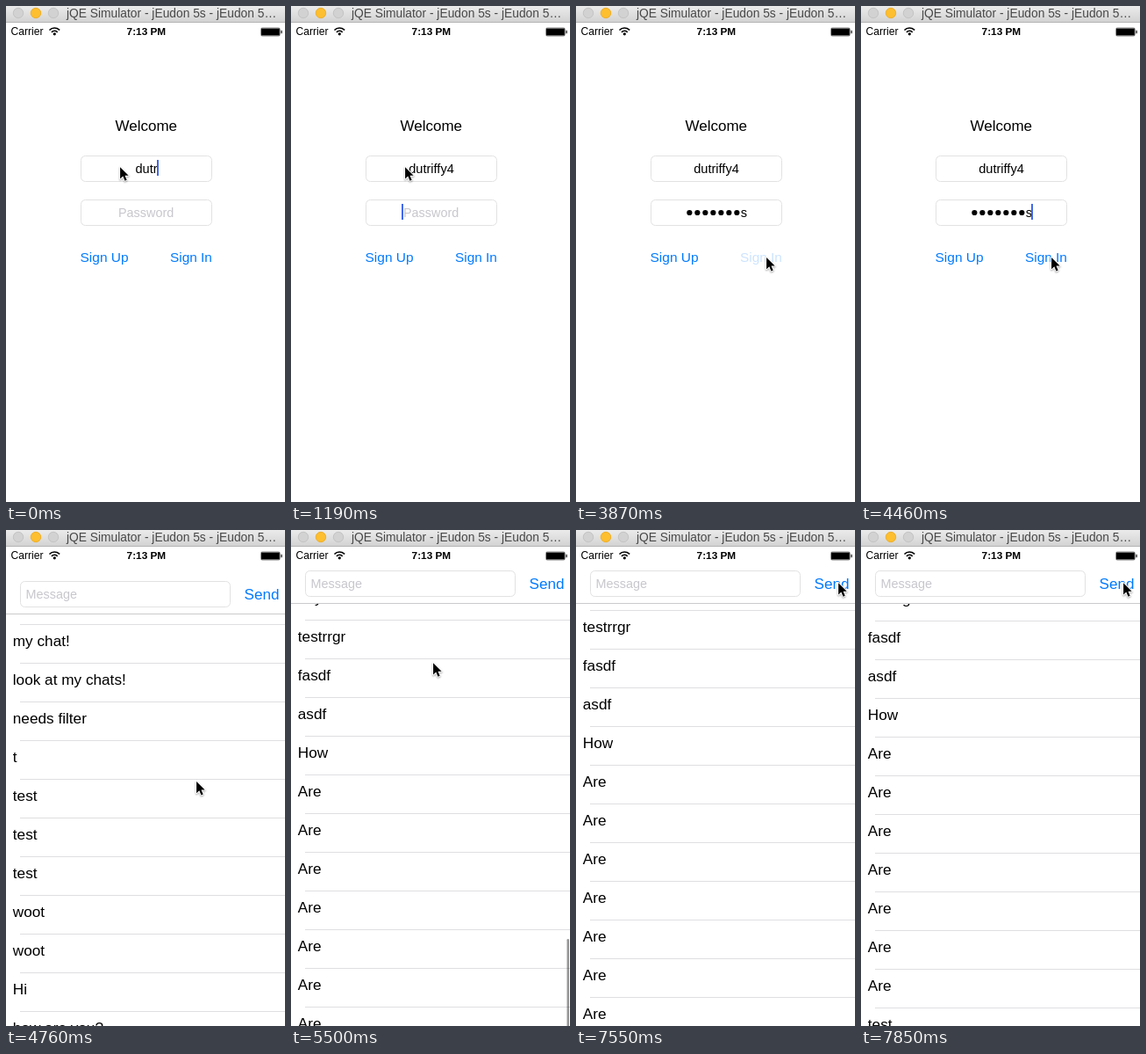
An HTML page with a canvas for the animation above (7990 ms loop, 318 px wide and 564 px high).

```html
<!DOCTYPE html>
<html lang="en">
<head>
<meta charset="utf-8">
<title>Sign in and chat</title>
<style>
  html, body { margin: 0; width: 100%; height: 100%; overflow: hidden; background: #fff; }
  canvas { display: block; width: 318px; height: 564px; }
</style>
</head>
<body>
<canvas id="stage"></canvas>
<script>
const W = 318, H = 564, LOOP = 7990;
const BLUE = '#007aff', HINT = '#c7c7cd', CARET = '#4068ee';
const FONT = '"Liberation Sans", Arial, sans-serif';
const USER = 'dutriffy4', SECRET = 'dutrilts', MESSAGE = 'test';

// Steps at which each key lands
const USER_KEYS = [0, 0, 0, 0, 1, 2, 2, 3, 6];
const SECRET_KEYS = [11, 12, 13, 15, 18, 20, 20, 21];
const MESSAGE_KEYS = [42, 43, 44, 45];

// Pointer stops: step, x, y
const POINTER = [
  [0, 129.3, 182.3], [22, 129.3, 182.3], [25, 216.3, 285], [33, 216.3, 285],
  [36, 161.3, 150.3], [38, 161.3, 150.3], [41, 240.3, 58.3], [46, 240.3, 58.3], [48, 298.3, 59.3]
];

const ROW = 44;
const ROWS = [
  'hello', 'my chat!', 'look at my chats!', 'needs filter', 't', 'test', 'test', 'test',
  'woot', 'woot', 'Hi', 'how are you?', 'good', 'test', 'hello', 'test', 'chat', 'woot',
  'Hi', 'test', 'hey there', 'test', 'asdf', 'test', 'hello', 'woot', 'test', 'hey',
  'testrrgr', 'fasdf', 'asdf', 'How', ...Array(7).fill('Are')
];
const FIRST_TOP = 51.5;
const SCROLL_END = FIRST_TOP + ROW * (ROWS.length - 1) - 542.5;

const canvas = document.getElementById('stage');
const ctx = canvas.getContext('2d');
const dpr = window.devicePixelRatio || 1;
canvas.width = W * dpr;
canvas.height = H * dpr;

const clamp = v => Math.min(1, Math.max(0, v));
const smooth = v => { v = clamp(v); return v * v * (3 - 2 * v); };
const typed = (keys, k) => keys.filter(at => k >= at).length;

// The screen refreshes in steps of about 148 ms
function stepAt(t) {
  return t < 3864 ? Math.floor((t + 12) / 149.2) : 26 + Math.floor((t - 3864) / 147.4);
}

function rect(x, y, w, h, color) {
  ctx.fillStyle = color;
  ctx.fillRect(x, y, w, h);
}

function text(str, x, y, size, color = '#000', weight = '') {
  ctx.font = `${weight} ${size}px ${FONT}`;
  ctx.fillStyle = color;
  ctx.fillText(str, x, y);
}

function widthOf(str, size) {
  ctx.font = `${size}px ${FONT}`;
  return ctx.measureText(str).width;
}

function disc(x, y, r, fill, stroke) {
  ctx.beginPath();
  ctx.arc(x, y, r, 0, Math.PI * 2);
  ctx.fillStyle = fill;
  ctx.fill();
  if (stroke) {
    ctx.strokeStyle = stroke;
    ctx.lineWidth = 1;
    ctx.stroke();
  }
}

function field(x, y, w) {
  ctx.beginPath();
  ctx.roundRect(x + 0.5, y + 0.5, w - 1, 29, 5);
  ctx.fillStyle = '#fff';
  ctx.fill();
  ctx.strokeStyle = '#e2e2e2';
  ctx.lineWidth = 1;
  ctx.stroke();
}

const caret = (x, y) => rect(Math.round(x), y, 2, 18, CARET);

function titleBar() {
  const shade = ctx.createLinearGradient(0, 0, 0, 18);
  shade.addColorStop(0, '#ebebeb');
  shade.addColorStop(1, '#d3d3d3');
  rect(0, 0, W, 18, shade);
  rect(0, 18, W, 1, '#b4b4b4');
  disc(14, 8, 5.7, '#d2d2d2', '#c4c4c4');
  disc(34, 8, 5.7, '#fdbe2f', '#eeb02c');
  disc(54, 8, 5.7, '#d2d2d2', '#c4c4c4');
  text('jQE Simulator - jEudon 5s - jEudon 5…', 69, 13, 13.8, '#484848');
}

function statusBar() {
  text('Carrier', 5.5, 33.3, 12.1);
  text('7:13 PM', 137.6, 33, 11.8, '#000', 'bold');
  ctx.strokeStyle = '#000';
  ctx.lineWidth = 1.6;
  for (const r of [4.6, 8]) {
    ctx.beginPath();
    ctx.arc(55.3, 33, r, -Math.PI * 0.76, -Math.PI * 0.24);
    ctx.stroke();
  }
  disc(55.3, 31.8, 1.6, '#000');
  ctx.strokeStyle = '#777';
  ctx.lineWidth = 0.8;
  ctx.beginPath();
  ctx.roundRect(290.4, 24.9, 22, 9.2, 1.8);
  ctx.stroke();
  rect(291, 25.5, 20.8, 8, '#000');
  rect(313.4, 27.8, 1.3, 3.4, '#222');
}

function signIn(k) {
  text('Welcome', 124.5, 142, 17);

  field(85, 170, 150);
  const name = USER.slice(0, typed(USER_KEYS, k));
  const nameW = widthOf(name, 14.6);
  text(name, 160 - nameW / 2, 189.5, 14.6);
  if (k < 8) caret(159 + nameW / 2, 175);

  field(85, 220, 150);
  const count = typed(SECRET_KEYS, k);
  const blink = k >= 26 && k < 29;
  if (!count) {
    text('Password', 128, 239.5, 14.4, HINT);
    if (k >= 8) caret(126, 225);
  } else {
    const last = SECRET[count - 1];
    const w = (count - 1) * 9 + widthOf(last, 14.6);
    const x = 160 - w / 2;
    for (let i = 0; i < count - 1; i++) disc(x + 4.5 + i * 9, 235, 3.1, '#000');
    text(last, x + (count - 1) * 9, 239.5, 14.6);
    if (!blink) caret(159.3 + w / 2, 225);
  }

  text('Sign Up', 84.5, 290.5, 15.5, BLUE);
  text('Sign In', 187, 290.5, 15.4, k === 26 || k === 27 ? '#cce4ff' : BLUE);
}

function chat(k) {
  // Sheet slides up on a damped spring
  const x = 2.73 * (k - 29.9);
  const drop = Math.round(546 * (1 + x) * Math.exp(-x));
  const flick = smooth((k - 33) / 4);
  const scroll = flick * SCROLL_END + 43 * smooth((k - 50) / 3);
  const rows = k > 50 ? [...ROWS, MESSAGE] : ROWS;

  ctx.save();
  ctx.translate(0, drop);
  rect(0, 19, W, H, '#fff');

  rows.forEach((label, i) => {
    const top = Math.round(FIRST_TOP + i * ROW - scroll - 0.5) + 0.5;
    if (top < 30 || top > H) return;
    text(label, 7.8, top + 24, 17.2);
    rect(16, top + ROW - 0.5, W - 16, 1, '#dfdee1');
  });

  const glow = k < 34 ? 0 : 0.42 * clamp((40 - k) / 2);
  if (glow) {
    ctx.beginPath();
    ctx.roundRect(314.5, 86 + 379 * flick, 2.5, 120, 1.25);
    ctx.fillStyle = `rgba(0,0,0,${glow})`;
    ctx.fill();
  }

  rect(0, 19, W, 64, '#fff');
  rect(0, 83, W, 1, '#cbcbcd');
  field(16, 46, 240);
  const draft = k < 50 ? MESSAGE.slice(0, typed(MESSAGE_KEYS, k)) : '';
  if (draft) text(draft, 23, 65.5, 14.4);
  else text('Message', 22.5, 65.5, 14.4, HINT);
  if (k >= 41 && k < 50) caret(23 + widthOf(draft, 14.4), 52);
  text('Send', 271.6, 66.5, 17.1, k === 49 ? '#cce4ff' : BLUE);
  ctx.restore();
}

function pointer(k) {
  const next = POINTER.findIndex(p => p[0] > k);
  const b = POINTER[next < 0 ? POINTER.length - 1 : next];
  const a = next < 0 ? b : POINTER[next - 1];
  const p = a === b ? 1 : smooth((k - a[0]) / (b[0] - a[0]));
  ctx.save();
  ctx.translate(a[1] + (b[1] - a[1]) * p, a[2] + (b[2] - a[2]) * p);
  const arrow = new Path2D('M.8 1V14.3L4 11.3L6.2 16.4L8.4 15.4L6.2 10.5H10.4Z');
  ctx.shadowColor = 'rgba(0,0,0,.35)';
  ctx.shadowBlur = 2 * dpr;
  ctx.shadowOffsetY = dpr;
  ctx.strokeStyle = '#fff';
  ctx.lineWidth = 2;
  ctx.lineJoin = 'round';
  ctx.stroke(arrow);
  ctx.shadowColor = 'transparent';
  ctx.fillStyle = '#000';
  ctx.fill(arrow);
  ctx.restore();
}

function draw(k) {
  ctx.setTransform(dpr, 0, 0, dpr, 0, 0);
  rect(0, 0, W, H, '#fff');
  if (k < 33) signIn(k);
  if (k > 30) chat(k);
  titleBar();
  statusBar();
  pointer(k);
}

const start = performance.now();
function loop() {
  draw(stepAt((performance.now() - start) % LOOP));
  requestAnimationFrame(loop);
}
loop();
</script>
</body>
</html>
```
